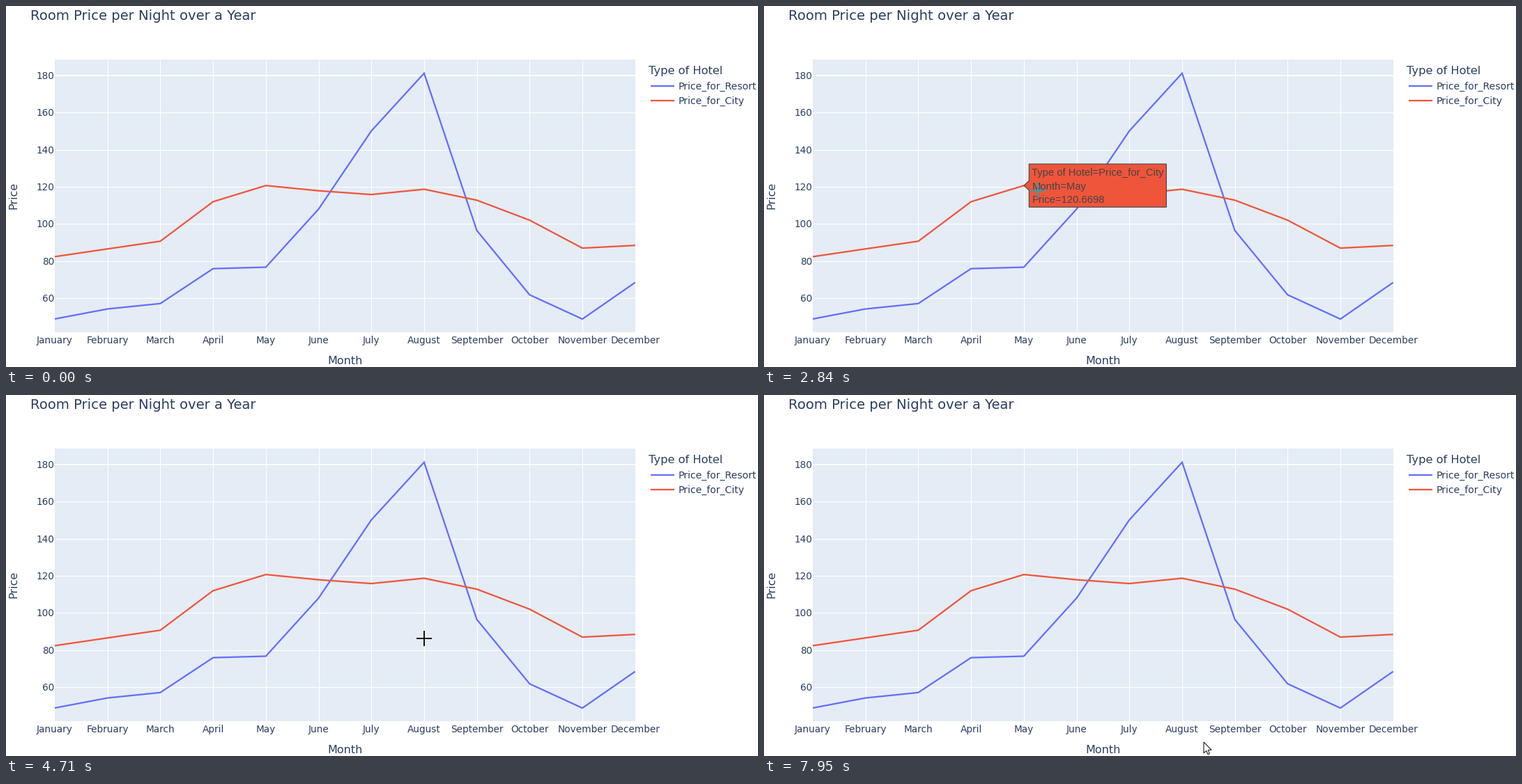
These frames come from a looping animation (1079x519 px, 8 s). A matplotlib script:

```python
import matplotlib.pyplot as plt
import numpy as np
from matplotlib.animation import FuncAnimation
from matplotlib.patches import Polygon, Rectangle

W, H, DPI = 1079, 519, 64
PT = 72 / DPI  # points per pixel
LOOP, TICK = 8000, 40

INK, PLOT_BG = "#2a3f5f", "#e4ecf5"
LEFT, RIGHT, TOP, BOTTOM = 70, 903, 77, 469
MONTHS = ["January", "February", "March", "April", "May", "June", "July",
          "August", "September", "October", "November", "December"]

# name: (line colour, tooltip ink, tooltip width, prices)
SERIES = {
    "Price_for_Resort": ("#636efa", "#ffffff", 214, [
        48.76, 54.15, 57.06, 75.87, 76.66, 107.9749,
        150.12, 181.2059, 96.42, 61.78, 48.71, 68.41]),
    "Price_for_City": ("#ef553b", "#444444", 197, [
        82.33, 86.52, 90.66, 111.96, 120.6698, 117.87,
        115.82, 118.6746, 112.78, 102.0, 86.94659, 88.40186]),
}

# pointer moves: start ms, end ms, points passed on the way
START = (660, 3)
MOVES = [
    (740, 1260, [(609, 101)]),
    (1590, 2380, [(550, 115), (480, 150), (415, 228), (376, 251)]),
    (2770, 3570, [(465, 324), (569, 327), (636, 284)]),
    (3640, 3780, [(602, 265)]),
    (4040, 4780, [(580, 322), (588, 352), (603, 349)]),
    (4850, 5190, [(564, 379)]),
    (5390, 6150, [(567, 388), (620, 415), (700, 450), (763, 470)]),
    (6220, 7020, [(785, 481), (822, 355), (878, 335), (901, 342)]),
    (7420, 7950, [(980, 440), (900, 487), (631, 499)]),
]
STEP = 68  # ms between pointer updates

ARROW = np.array([(0, 0), (0, 15.8), (3.7, 12.4), (6, 17.8), (8.4, 16.8),
                  (6.2, 11.5), (11, 11.3)])
ARM = 11
HOVER = 22


def px(month):
    return LEFT + 75.7 * month


def py(price):
    return 99.9 + 2.667 * (180 - price)


def pointer(t):
    """Pointer position at time t, or None before it appears."""
    pos, origin = None, START
    for t0, t1, points in MOVES:
        if t < t0:
            break
        steps = round((t1 - t0) / STEP)
        done = min(int((t - t0) / (t1 - t0) * steps), steps)
        u = (done + 1) / (steps + 1)
        u = u * u * (3 - 2 * u)
        track = np.array([origin, *points])
        marks = np.linspace(0, 1, len(track))
        pos = [np.interp(u, marks, axis) for axis in track.T]
        origin = points[-1]
    return pos


fig = plt.figure(figsize=(W / DPI, H / DPI), dpi=DPI, facecolor="white")
ax = fig.add_axes([0, 0, 1, 1])
ax.set_xlim(0, W)
ax.set_ylim(H, 0)
ax.axis("off")


def label(x, y, text, size, font="DejaVu Sans", color=INK, **kw):
    return ax.text(x, y, text, fontsize=size * PT, family=font, color=color,
                   **{"va": "baseline", **kw})


def line(x, y, color, width, **kw):
    return ax.plot(x, y, color=color, lw=width * PT, solid_capstyle="butt",
                   solid_joinstyle="miter", **kw)[0]


# chart
area = Rectangle((LEFT, TOP), RIGHT - LEFT, BOTTOM - TOP, fc=PLOT_BG, lw=0)
ax.add_patch(area)
for i, month in enumerate(MONTHS):
    if 0 < i < 11:
        line([px(i)] * 2, [TOP, BOTTOM], "white", 1.2)
    label(px(i), 485, month, 13.6, ha="center")
for price in range(60, 181, 20):
    y = py(price)
    line([LEFT, RIGHT], [y, y], "white", 2 if price == 180 else 1.2)
    label(69.5, y + 5, str(price), 13.6, ha="right")

for row, (name, (color, _, _, prices)) in enumerate(SERIES.items()):
    curve = line([px(i) for i in range(12)], [py(p) for p in prices],
                 color, 2.27, zorder=3)
    curve.set_clip_path(area)
    y = 114.8 + 21.3 * row
    line([925, 959], [y, y], color, 2.27)
    label(965, y + 5, name, 14.05)

label(35, 20, "Room Price per Night over a Year", 19.65)
label(922, 98, "Type of Hotel", 16.2)
label(486.5, 515, "Month", 16, ha="center")
label(15, 272.5, "Price", 16, ha="center", rotation=90,
      rotation_mode="anchor")

# tooltip and pointer
tip = ax.add_patch(Polygon([(0, 0), (1, 0), (1, 1)], lw=1.14 * PT, zorder=5))
tip_text = [label(0, 0, "", 14.7, "Liberation Sans", zorder=6)
            for _ in range(3)]
cross = [line([], [], "#1a1309", 2, zorder=7) for _ in range(2)]
cross_inv = [line([], [], "black", 2, zorder=8) for _ in range(2)]
arrow = ax.add_patch(Polygon(ARROW, fc="white", ec="#1c1c1c", lw=1.1 * PT,
                             joinstyle="miter", zorder=9))


def inverse(color):
    return "#%06x" % (0xFFFFFF - int(color[1:], 16))


def nearest(x, y):
    """Closest data point in hover range as (series, month), or None."""
    points = [(np.hypot(px(i) - x, py(p) - y), name, i)
              for name, s in SERIES.items() for i, p in enumerate(s[3])]
    dist, name, i = min(points)
    return (name, i) if dist < HOVER else None


def show_tip(hit):
    for artist in (tip, *tip_text, *cross_inv):
        artist.set_visible(hit is not None)
    if hit is None:
        return
    name, i = hit
    color, ink, width, prices = SERIES[name]
    x, y = px(i), py(prices[i])
    side = -1 if i == 11 else 1
    near, far = x + 7.5 * side, x + (7.5 + width) * side
    tip.set_xy([(x, y), (near, y + 6.8), (near, y + 31), (far, y + 31),
                (far, y - 31), (near, y - 31), (near, y - 6.8)])
    tip.set_facecolor(color)
    tip.set_edgecolor(ink)
    rows = (f"Type of Hotel={name}", f"Month={MONTHS[i]}",
            f"Price={prices[i]:.7g}")
    for k, (text, row) in enumerate(zip(tip_text, rows)):
        text.set_text(row)
        text.set_color(ink)
        text.set_position((min(near, far) + 4.2, y - 14 + 19.4 * k))
    for arm in cross_inv:
        arm.set_color(inverse(color))
        arm.set_clip_path(tip)


def update(n):
    pos = pointer(n * TICK + 30)
    x, y = pos or START
    inside = pos is not None and LEFT <= x <= RIGHT and TOP <= y <= 482

    arrow.set_visible(pos is not None and not inside)
    arrow.set_xy(ARROW + (x, y))
    for pair in (cross, cross_inv):
        pair[0].set_data([x - ARM, x + ARM], [y, y])
        pair[1].set_data([x, x], [y - ARM, y + ARM])
    for arm in cross:
        arm.set_visible(inside)
    show_tip(nearest(x, y) if inside else None)
    return []


anim = FuncAnimation(fig, update, frames=LOOP // TICK, interval=TICK,
                     repeat=True, repeat_delay=0, blit=False)
plt.show()
```
